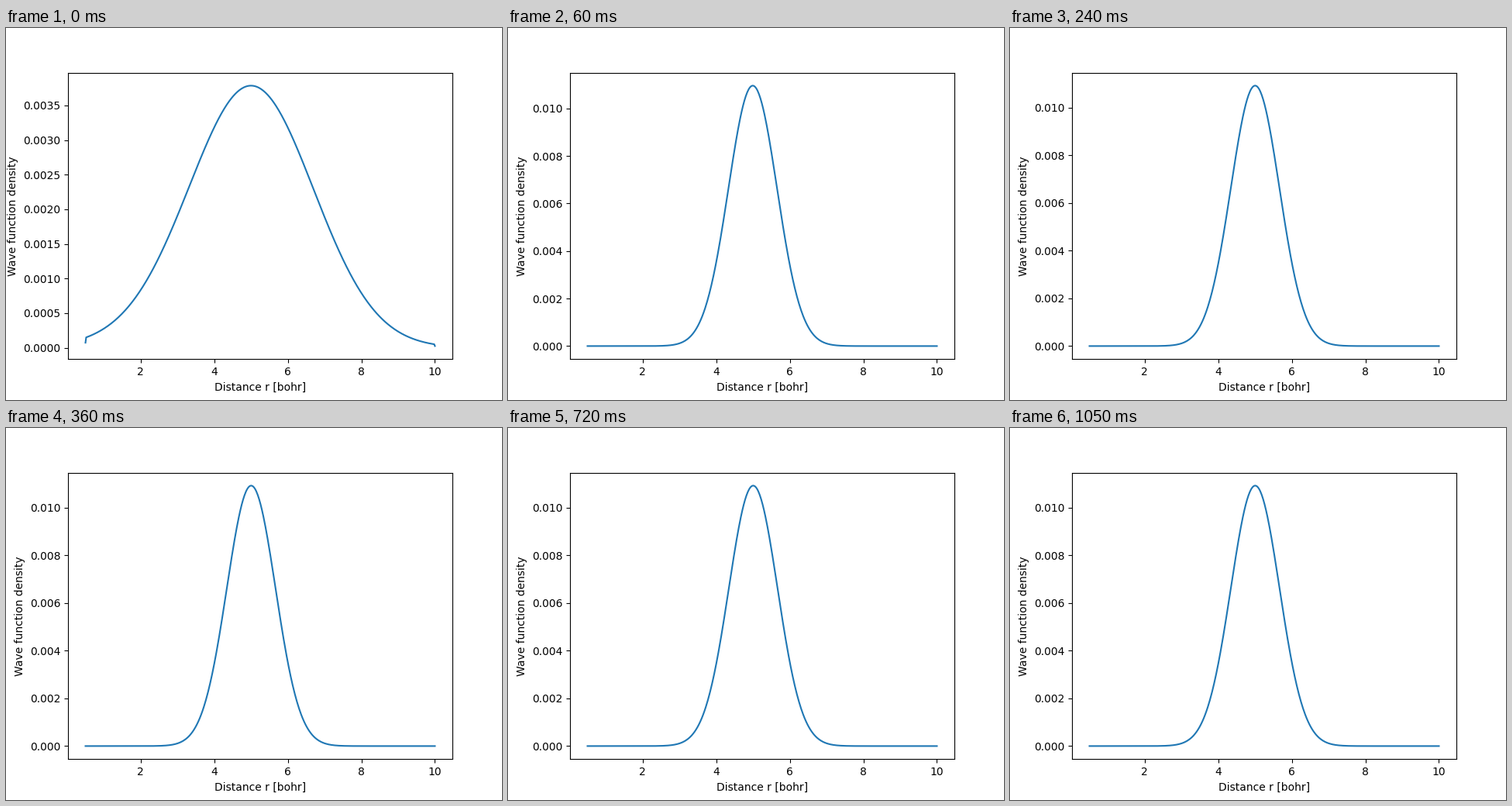
These frames come from a looping animation (640x480 px, 1870 ms). A matplotlib script:

```python
import numpy as np
import matplotlib.pyplot as plt
from matplotlib.animation import FuncAnimation

INTERVAL = 10        # ms per frame
FRAMES = 187         # one loop lasts 1870 ms
FRAMES_PER_STEP = 3  # the solver advances every 30 ms
LAST_STEP = 35
DECAY = 0.7

r = np.linspace(0.5, 10, 500)


def gaussian(peak, center, sigma):
    return peak * np.exp(-0.5 * ((r - center) / sigma) ** 2)


def start_density():
    """Broad first guess with half weight at both ends of the grid."""
    u = r - 5
    tail = np.where(u < 0, 0.00065 * u ** 4, 0)
    y = 0.003785 * np.exp(-0.174 * u ** 2 + tail)
    y[[0, -1]] *= 0.5
    return y


def density(step):
    if step == 0:
        return start_density()
    if step == 1:
        return gaussian(0.01076, 4.735, 0.672)
    # Settle geometrically on the converged state.
    rest = DECAY ** (step - 2)
    return gaussian(0.010922 + 0.00004 * rest,
                    5.005 - 0.012 * rest,
                    0.6614 - 0.0018 * rest)


fig, ax = plt.subplots(figsize=(6.4, 4.8), dpi=100)
line, = ax.plot(r, density(0), color="#1f77b4", lw=1.5)
ax.set_xlabel("Distance r [bohr]")
ax.set_ylabel("Wave function density")


def update(frame):
    step = min(frame // FRAMES_PER_STEP, LAST_STEP)
    line.set_ydata(density(step))
    ax.relim()
    ax.autoscale_view()
    return line,


anim = FuncAnimation(fig, update, frames=FRAMES, interval=INTERVAL,
                     repeat=True, repeat_delay=0, blit=False)
plt.show()
```
